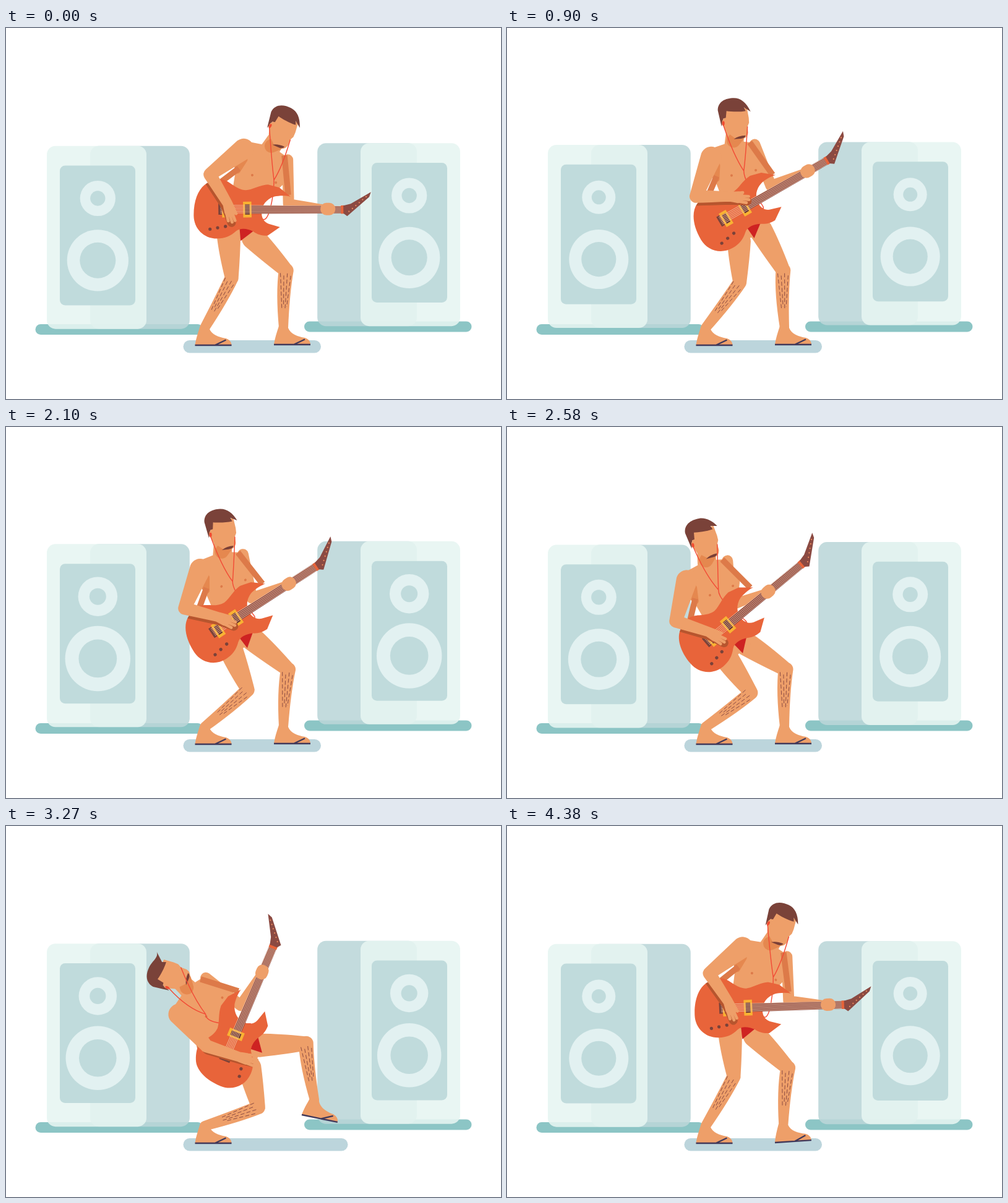
These frames come from a looping animation (800 by 600 pixels, 4410 ms). An HTML page:

```html
<!DOCTYPE html>
<html lang="en">
<head>
<meta charset="utf-8">
<title>Guitar player</title>
<style>
html, body { margin: 0; width: 100%; height: 100%; overflow: hidden; background: #fff; }
svg { display: block; width: 100vw; height: 100vh; }
</style>
</head>
<body>
<svg viewBox="0 0 800 600" xmlns="http://www.w3.org/2000/svg">
  <defs>
    <path id="body" d="M303 302C303 275 313 255 327 249C337 244.500 347 243 352 244.500C364 248 372 261 388 262C400 261 410 254 424 253.500L442 258.500L460 273.500C450 271 440 272 434 273C420 277 413 288 413 298C412 306 416 314 424 317L442 322.500L422 336C412 336 406 334 399 329C390 324 378 322 371 328C362 336 353 339.500 340 339.500C318 339 303 322 303 302Z"/>
    <clipPath id="onBody">
      <use href="#body" transform="translate(-36 68) rotate(-18.4) translate(-343 -291)"/>
    </clipPath>
    <g id="foot">
      <path d="M0 0C1 -8 4 -18 8 -30L23 -27C27 -17 38 -13 50 -11C56 -9 59 -5 59 0Z" fill="#ee9f69"/>
      <path d="M0 0H59M32 0L50 -8.500" fill="none" stroke="#41395a" stroke-width="2.300"/>
    </g>
    <g id="speaker">
      <rect x="47.500" y="479" width="270.500" height="17" rx="8.500" fill="#8cc5c5"/>
      <g class="box">
        <rect x="136" y="190.700" width="160.800" height="296" rx="14" fill="#bbd7d9" opacity=".88"/>
        <rect x="66" y="190.700" width="161" height="296" rx="14" fill="#e6f5f2" opacity=".88"/>
        <rect x="87" y="222.500" width="122" height="226" rx="8.500" fill="#c0dbdc"/>
        <circle cx="148.300" cy="275.500" fill="#e2f1f1"/>
        <circle cx="148.300" cy="275.500" fill="#c0dbdc"/>
        <circle cx="148.300" cy="375.800" fill="#e2f1f1"/>
        <circle cx="148.300" cy="375.800" fill="#c0dbdc"/>
      </g>
    </g>
  </defs>
  <g id="left"></g>
  <g id="right" transform="translate(800 -4.500) scale(-1 1)"></g>
  <rect id="floor" x="286.500" y="505" height="20.600" rx="10.300" fill="#bcd5dc"/>
  <g id="legs"></g>
  <g id="upper">
    <g id="back"></g>
    <path d="M-29 -46L15 -51L47 -41L50 -3L26 40L29 96L-9 107L-25 0Z" fill="#ee9f69" stroke="#ee9f69" stroke-width="6" stroke-linejoin="round"/>
    <path d="M3 80L30 84L14 107Z" fill="#ce2222"/>
    <g id="neck"></g>
    <path d="M40 -46L65 13M-46 27L-24 -4" fill="none" stroke="#dd7a49" stroke-width="9.500"/>
    <g fill="#dd7a49"><circle r="2"/><circle cx="40" r="2"/></g>
    <g id="head">
      <path d="M0 -24L38 -24L41 -8L41.500 0L39 6L40 16C39 22 36 25.500 30 26L20 26L4 14L0 4Z" fill="#ee9f69"/>
      <path d="M17 26.500Q24 21 36 20.500Q35 25.500 28 25.800Z" fill="#7a3f36"/>
      <path id="hair" fill="#7a4239"/>
      <ellipse cx="1.500" rx="3.800" ry="6" fill="#ee9f69"/>
      <ellipse cx="0" cy="1" rx="2" ry="3.600" fill="#f04a30"/>
    </g>
    <g id="wires"></g>
    <g transform="translate(-36 68) rotate(-18.4) translate(-343 -291)">
      <use href="#body" fill="#e8643a"/>
      <g fill="#7a4239">
        <circle cx="329" cy="324" r="2.600"/><circle cx="341.300" cy="322" r="2.600"/><circle cx="354" cy="320" r="2.600"/>
        <path d="M343 283h5.500v18h-5.500z"/>
      </g>
      <path d="M395 286.800L545 289.500V302L395 300.300Z" fill="#8b4a42"/>
      <path d="M349 280.500h13v25h-13zM383 280.500h13.500v25.500h-13.500z" fill="#f9b233"/>
      <path d="M352 285h7v16h-7zM386 285h7.500v16.500h-7.500z" fill="#6d3a33"/>
      <path id="strings" fill="none" stroke="#f2c3a5" stroke-width=".8"/>
      <path d="M541 289h5.500v13.500h-5.500z" fill="#e8643a"/>
      <path d="M545 289.500L557 286.500L590 268L587 276L551 306.500L545 302Z" fill="#8b4a42"/>
      <g id="pegs" fill="#ee8a5c"></g>
      <rect id="fist" y="284.500" width="24" height="20" rx="9.500" fill="#ee9f69"/>
    </g>
    <g id="front"></g>
  </g>
</svg>
<script>
const $ = id => document.getElementById(id);
const NS = 'http://www.w3.org/2000/svg';
const LOOP = 4410, STEP = 30;
const SKIN = '#ee9f69', SHADE = '#e5884f';

function make(tag, parent, attrs) {
  const el = document.createElementNS(NS, tag);
  for (const k in attrs) el.setAttribute(k, attrs[k]);
  return parent.appendChild(el);
}

// x, y, lean: chest; bob: head tilt; flick: fringe; strum, grip: hands; kick: raised leg
const low = { x: 398, y: 238, lean: 17.5, bob: 9.5, flick: -18, strum: -8, grip: 177, kick: 0 };
const up = { ...low, x: 363, y: 238.5, lean: -12.3, bob: 12.3, strum: -25, grip: 165 };
const bent = { ...low, x: 425, y: 254.5, lean: 31, bob: 14, flick: -9, strum: -11, grip: 183 };
const back = { ...low, x: 328, y: 272, lean: -22, bob: 12, flick: -23, strum: -10, grip: 131 };
const kick = { x: 323.5, y: 308, lean: -49.5, bob: -14, flick: -40, strum: 20, grip: 156, kick: 1 };
const toss = { ...bent, bob: -9, flick: -41, strum: -14, grip: 127 };

function blend(a, b, k) {
  const p = {};
  for (const n in a) p[n] = a[n] + (b[n] - a[n]) * k;
  return p;
}

const keys = [
  [0, low], [170, blend(low, bent, .6)], [540, blend(up, low, .1)], [900, up],
  [1140, blend(up, bent, -.13)], [1590, bent], [2170, blend(up, back, .6)], [2580, back],
  [3270, kick], [3840, toss], [4200, blend(low, up, .75)], [4380, blend(low, up, .06)]
];
const N = keys.length;
const keyTime = i => keys[(i + N) % N][0] + LOOP * Math.floor(i / N);

// Smooth periodic curve through the keys without overshoot
function sample(name, seg, t) {
  const val = i => keys[(i + N) % N][1][name];
  const rate = i => (val(i + 1) - val(i)) / (keyTime(i + 1) - keyTime(i));
  const slope = i => {
    const p = rate(i - 1), q = rate(i);
    return p * q > 0 ? 2 * p * q / (p + q) : 0;
  };
  const h = keyTime(seg + 1) - keyTime(seg), u = (t - keyTime(seg)) / h, v = 1 - u;
  return val(seg) * (1 + 2 * u) * v * v + val(seg + 1) * u * u * (3 - 2 * u)
    + h * u * v * (slope(seg) * v - slope(seg + 1) * u);
}

function poseAt(t) {
  let seg = N - 1;
  while (keyTime(seg) > t) seg--;
  const p = {};
  for (const n in low) p[n] = sample(n, seg, t);
  return p;
}

const add = (a, b) => [a[0] + b[0], a[1] + b[1]];
const mix = (a, b, k) => [a[0] + (b[0] - a[0]) * k, a[1] + (b[1] - a[1]) * k];
const fmt = p => p[0].toFixed(2) + ' ' + p[1].toFixed(2);
function place(origin, deg, x, y) {
  const r = deg * Math.PI / 180, c = Math.cos(r), s = Math.sin(r);
  return [origin[0] + x * c - y * s, origin[1] + x * s + y * c];
}

// Middle joint of a two-bone chain from a to b
function bend(a, b, la, lb, side) {
  const dx = b[0] - a[0], dy = b[1] - a[1], d = Math.hypot(dx, dy);
  const k = (la * la - lb * lb + d * d) / (2 * d);
  const h = side * Math.sqrt(Math.max(0, la * la - k * k));
  return [a[0] + (dx * k + dy * h) / d, a[1] + (dy * k - dx * h) / d];
}

// Tapered rounded limb; kl and kr swell its two sides
function limb(a, ra, b, rb, kl = 0, kr = 0) {
  const dx = b[0] - a[0], dy = b[1] - a[1], len = Math.hypot(dx, dy) || 1;
  const off = (p, d) => [p[0] - dy / len * d, p[1] + dx / len * d];
  const m = mix(a, b, .4), w = ra * .6 + rb * .4;
  return `M${fmt(off(a, ra))}Q${fmt(off(m, w + kl))} ${fmt(off(b, rb))}`
    + `A${rb} ${rb} 0 0 0 ${fmt(off(b, -rb))}Q${fmt(off(m, -w - kr))} ${fmt(off(a, -ra))}`
    + `A${ra} ${ra} 0 0 0 ${fmt(off(a, ra))}Z`;
}

// Rows of hair along a shin
function fuzz(a, b) {
  const dx = b[0] - a[0], dy = b[1] - a[1], len = Math.hypot(dx, dy);
  let d = '';
  for (let i = 0; i < 4; i++) {
    const w = i * 5.6 - 9;
    const at = (k, s) => fmt([a[0] + dx * k + dy / len * w * s, a[1] + dy * k - dx / len * w * s]);
    d += `M${at(.05 + i % 2 * .04, 1)}L${at(.68 - i % 2 * .05, .45)}`;
  }
  return d;
}

const shape = (id, fill) => make('path', $(id), { fill });
const line = (id, stroke, width) =>
  make('path', $(id), { fill: 'none', stroke, 'stroke-width': width });

const legR = shape('legs', SKIN), legL = shape('legs', SKIN);
const footR = make('use', $('legs'), { href: '#foot' });
make('use', $('legs'), { href: '#foot', transform: 'translate(305.5 513)' });
const hairs = line('legs', '#8b4a42', 1);
hairs.setAttribute('stroke-dasharray', '6.5 3.5');
const armR = shape('back', SKIN);
const throat = shape('neck', SKIN), throatShade = shape('neck', SHADE);
const wire = line('wires', '#f24a35', 1.4);
const armShade = make('path', make('g', $('front'), { 'clip-path': 'url(#onBody)' }), { fill: '#b7552e' });
const armL = shape('front', SKIN);
const fingers = line('front', SKIN, 4.8);
fingers.setAttribute('stroke-linecap', 'round');

let strings = '';
for (let i = 0; i < 6; i++) {
  strings += `M346 ${285.5 + i * 2.5}L547 ${290.5 + i * 2.1}`;
  make('circle', $('pegs'), { cx: 554 + i * 5.6, cy: 299 - i * 4.7, r: 1.1 });
}
$('strings').setAttribute('d', strings);

const boxes = ['left', 'right'].map(id => {
  const g = $('speaker').cloneNode(true);
  g.removeAttribute('id');
  $(id).appendChild(g);
  return g.querySelector('.box');
});

// Joints in the chest's own frame
const SHOULDER_L = [-26, -36], SHOULDER_R = [47, -41], NAPE = [15, -60], ARMPIT = [-25, 0];
const TILT = -18.4;
const onGuitar = (x, y) => place([-36, 68], TILT, x, y);
shape('neck', SHADE).setAttribute('d', limb(mix(SHOULDER_L, ARMPIT, .45), 11, ARMPIT, 5));

const ease = u => u * u * (3 - 2 * u);
const beats = [70, 580, 1090, 1590, 1985, 2380, 2755, 3130, 3550, 4050, 4480];
const pulse = t => Math.max(...beats.map(b => {
  const d = t - b;
  return ease(Math.max(0, d < 0 ? 1 + d / 100 : 1 - d / 280));
}));
const taps = [[240, 520], [600, 880], [3980, 4410]];
function tap(t) {
  const w = taps.find(([a, b]) => t > a && t < b);
  return w ? -17 * Math.sin(Math.PI * (t - w[0]) / (w[1] - w[0])) : 0;
}

const set = (el, d) => el.setAttribute('d', d);
const move = (el, o, deg) => el.setAttribute('transform', `translate(${fmt(o)}) rotate(${deg.toFixed(2)})`);

function drawSpeakers(t) {
  const s = pulse(t), r1 = 27 + 7.5 * s, r2 = 48 + 7.5 * s;
  const hop = .9 * Math.cos(14 * Math.PI * t / LOOP) - .9;
  for (const box of boxes) {
    box.setAttribute('transform', `translate(0 ${hop.toFixed(2)})`);
    const c = box.querySelectorAll('circle');
    [r1, r1 * .425, r2, r2 * .585].forEach((r, i) => c[i].setAttribute('r', r));
  }
}

function drawLegs(p, t) {
  const sway = p.lean * .17, chest = [p.x, p.y];
  const hipL = place(chest, p.lean, sway - 9, 107), hipR = place(chest, p.lean, sway + 29, 96);
  const heel = mix([433, 512], [478, 467], p.kick), turn = 11.7 * p.kick + tap(t);
  const ankleL = [321, 485], ankleR = place(heel, turn, 15.5, -27);
  const kneeL = bend(hipL, ankleL, 66, 92, 1), kneeR = bend(hipR, ankleR, 75, 93, 1);
  set(legL, limb(hipL, 19, kneeL, 11, 2, 1) + limb(kneeL, 11, ankleL, 8, -1, 3));
  set(legR, limb(hipR, 19, kneeR, 11.5, 1, 2) + limb(kneeR, 12, ankleR, 7.5, 5, -3));
  move(footR, heel, turn);
  set(hairs, fuzz(kneeL, ankleL) + fuzz(kneeR, ankleR));
  $('floor').setAttribute('width', 222.5 + 43.5 * p.kick);
}

function drawHead(p) {
  const skull = (x, y) => place(NAPE, p.bob, x - 15.2, y - 23.5);
  move($('head'), skull(0, 0), p.bob);
  set($('hair'), `M-3 6L-9 -20C-9 -34 3 -40 17 -40C28 -40 37 -33 44 ${p.flick.toFixed(2)}`
    + 'L33 -25L36 -19C25 -17 12 -18 5 -19L4 -8L0 -7Z');
  set(throat, limb(skull(19, 12), 14, [15, -49], 15.5));
  set(throatShade, limb(skull(24, 20), 11, [15, -54], 11));

  const hang = (o, d) => place(o, -p.lean, 0, d);
  const fork = [27 + p.lean / 2, -3], jack = onGuitar(70, 17);
  const strand = a => `M${fmt(a)}Q${fmt(hang(mix(a, fork, .5), 12))} ${fmt(fork)}`;
  set(wire, strand(skull(0, 4)) + strand(skull(39, 6))
    + `C${fmt(hang(fork, 25))} ${fmt(add(jack, [14, 8]))} ${fmt(jack)}`);
}

function drawArms(p) {
  const hand = onGuitar(p.grip, 3.5), elbowR = bend(SHOULDER_R, hand, 72, 64, -1);
  set(armR, limb(SHOULDER_R, 9, elbowR, 9) + limb(elbowR, 9, hand, 6));
  $('fist').setAttribute('x', 331 + p.grip);

  const wrist = onGuitar(15 + Math.max(0, -10 - p.strum) * 1.4, p.strum);
  const aim = TILT + Math.min(83, 90 + 2.2 * p.strum);
  const elbow = bend(SHOULDER_L, wrist, 68, 55, -1);
  const reach = (x, y) => place(wrist, aim, x, y), drop = [-1, 5];
  set(armShade, limb(add(elbow, drop), 10, add(wrist, drop), 8)
    + limb(add(wrist, drop), 8, add(reach(28, 0), drop), 7));
  set(armL, limb(SHOULDER_L, 17, elbow, 10.5) + limb(elbow, 10.5, wrist, 8)
    + limb(wrist, 8, reach(13, 0), 9.5));
  set(fingers, [20, 30, 31, 27].map((len, i) => {
    const y = i * 5.3 - 8;
    return `M${fmt(reach(12, y * .8))}L${fmt(reach(len, y))}`;
  }).join(''));
}

function draw(t) {
  const p = poseAt(t);
  drawSpeakers(t);
  drawLegs(p, t);
  move($('upper'), [p.x, p.y], p.lean);
  drawHead(p);
  drawArms(p);
}

const start = performance.now();
function frame() {
  const t = (performance.now() - start) % LOOP;
  draw(Math.floor(t / STEP) * STEP);
  requestAnimationFrame(frame);
}
frame();
</script>
</body>
</html>
```
